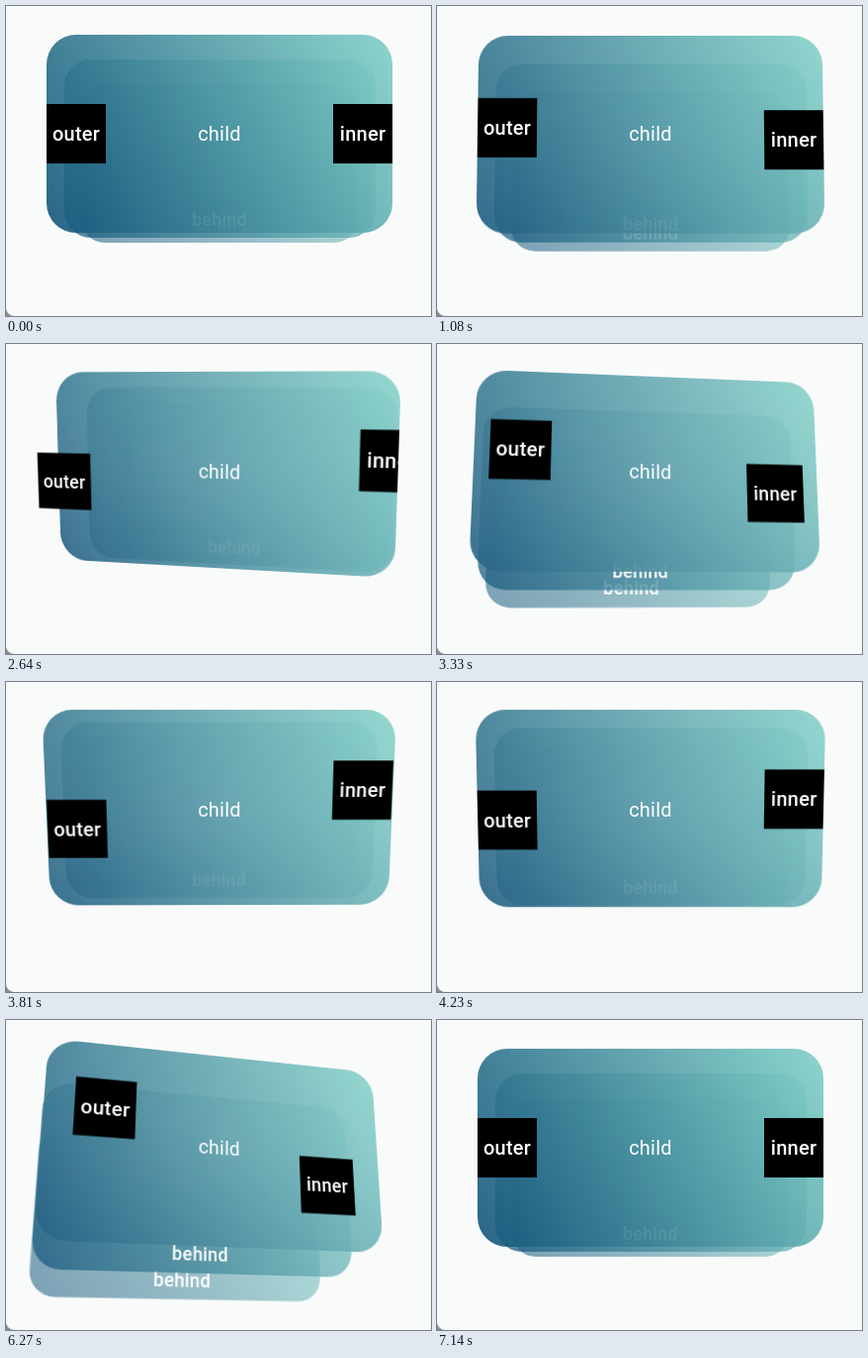
An HTML page that plays this animation: 430 by 313 pixels, repeating every 7170 ms.

```html
<!DOCTYPE html>
<html lang="en">
<head>
<meta charset="utf-8">
<title>Tilt card</title>
<style>
  html, body { margin: 0; width: 100%; height: 100%; overflow: hidden; background: #f9fbfa; }
  body { position: relative; color: #fff; font: 20px/24px Roboto, Arial, sans-serif; letter-spacing: .25px; }
  .scene { position: absolute; left: 41px; top: 29px; width: 350px; height: 200px; }
  .scene div { position: absolute; }
  .panel { background: linear-gradient(60.26deg, rgb(19 84 122 / var(--a)), rgb(128 208 199 / var(--a))); }
  .card { inset: 0; border-radius: 30px; overflow: hidden; --a: .9; }
  .mid { left: 17.5px; top: 25px; width: 315px; height: 180px; border-radius: 27px; --a: .72; }
  .back { left: 35px; top: 50px; width: 280px; height: 160px; border-radius: 24px; --a: .54; }
  .glow { inset: 0; background: radial-gradient(rgb(255 255 255 / .15), rgb(255 255 255 / .07)); }
  .label { left: 0; right: 0; text-align: center; }
  .card .label { top: 88px; }
  .mid .label, .back .label { bottom: 6px; font-size: 17.8px; font-weight: 500; }
  .box { top: 70px; width: 60px; height: 60px; background: #000; text-align: center; line-height: 60px; font-weight: 500; }
  .outer { left: 0; }
  .inner { right: 0; }
  .corner { position: absolute; left: 0; bottom: 0; width: 9px; height: 9px;
    background: radial-gradient(circle at 9px 0, transparent 8.6px, #8b8d8d 9.6px); }
</style>
</head>
<body>
<div class="scene">
  <div class="panel back"><div class="label">behind</div></div>
  <div class="panel mid"><div class="label">behind</div></div>
  <div class="panel card">
    <div class="glow"></div>
    <div class="label">child</div>
    <div class="box inner">inner</div>
  </div>
  <div class="box outer">outer</div>
</div>
<div class="corner"></div>
<script>
const LOOP = 7170, STEP = 30;

// turning points of each swing: time in ms, degrees
const PITCH = [
  [930, 0], [1500, 19], [2480, -15], [2970, 17], [4110, -15], [4450, 20], [5100, 0],
  [5310, 0], [5540, 10], [6040, 19], [6960, 0]
];
const YAW = [
  [1500, 0], [1980, 4.5], [2680, -12], [3270, 7.7], [3900, 0], [4450, 0], [4740, -19],
  [5100, 0], [5310, 0], [5640, -19], [6450, 19], [6860, 0]
];

// how far each part slides per degree of tilt
const SLIDE = { outer: 2, inner: -2, mid: -1.3, back: -2.5 };

const find = name => document.querySelector('.' + name);
const scene = find('scene'), glow = find('glow');
const parts = Object.entries(SLIDE).map(([name, rate]) => [find(name), rate]);

// cosine ease from one turning point to the next, at rest outside them
function swing(points, t) {
  const i = points.findIndex(p => p[0] > t);
  if (i < 1) return 0;
  const [t0, from] = points[i - 1], [t1, to] = points[i];
  return from + (to - from) * (1 - Math.cos(Math.PI * (t - t0) / (t1 - t0))) / 2;
}

function draw(now) {
  const t = Math.floor(now % LOOP / STEP) * STEP;
  const pitch = swing(PITCH, t), yaw = swing(YAW, t);
  scene.style.transform = `perspective(700px) rotateX(${pitch}deg) rotateY(${yaw}deg)`;
  glow.style.opacity = Math.min(1, Math.hypot(pitch, yaw) / 6);
  for (const [el, rate] of parts) {
    el.style.transform = `translate(${rate * yaw}px, ${-rate * pitch}px)`;
  }
}

const start = performance.now();
function tick() {
  draw(performance.now() - start);
  requestAnimationFrame(tick);
}
tick();
</script>
</body>
</html>
```
